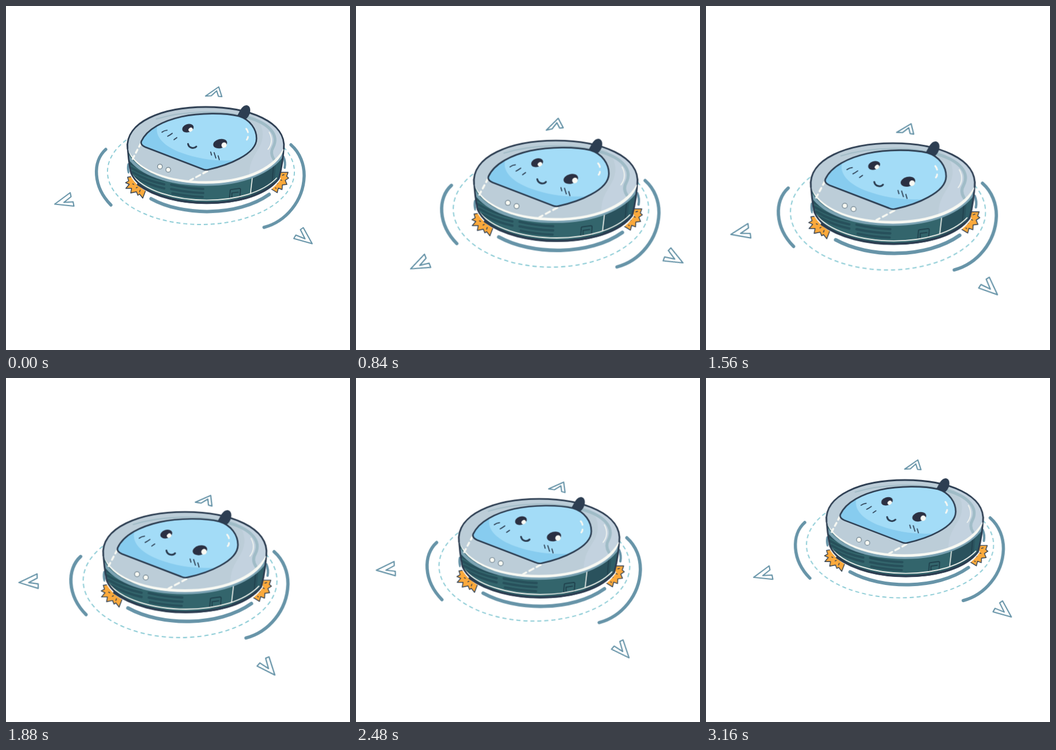
Recreate the animation shown at these times as an HTML page without scripts. Size 600 by 600 pixels, loop 3200 ms.

```html
<!DOCTYPE html>
<html lang="en">
<head>
<meta charset="utf-8">
<title>Robot vacuum</title>
<style>
html, body { margin: 0; width: 100%; height: 100%; overflow: hidden; background: #fff; }
svg { display: block; width: 100vw; height: 100vh; }
.line { fill: none; stroke-linecap: round; stroke-linejoin: round; }
.navy { stroke: #2b3c50; }
.white { stroke: #f8f9f3; }

/* The robot drives a triangle, growing as it comes nearer */
.drive { transform-origin: 348.5px 345px; animation: drive 3.2s linear infinite; }
.floor { transform-origin: 339px 298.5px; animation: floor 3.2s linear infinite; }
.orbit { transform-origin: 340px 289px; animation: orbit 3.2s linear infinite; }
.turn { transform-origin: 345px 247.5px; animation: turn 3.2s cubic-bezier(.333, 0, .667, 1) infinite; }

@keyframes drive {
  0%, 100% { transform: translate(0, 0) scale(1); }
  32.5% { transform: translate(0, 82px) scale(1.056); }
  65% { transform: translate(-45px, 61px) scale(1.041); }
}
@keyframes floor {
  0%, 100% { transform: translate(0, 0) scale(1); }
  32.5% { transform: translate(0, 80.5px) scale(1.057); }
  65% { transform: translate(-45px, 59.5px) scale(1.042); }
}
@keyframes orbit {
  0%, 100% { transform: translate(0, 0) scale(1, 1); }
  32.5% { transform: translate(0, 80.5px) scale(1.056, 1.125); }
  65% { transform: translate(-45px, 60.5px) scale(1.032, 1.07); }
}
@keyframes turn {
  0%, 86.25%, 100% { transform: rotate(0deg); }
  12.5%, 27% { transform: rotate(-10deg); }
  36.25%, 51% { transform: rotate(4deg); }
  62%, 74% { transform: rotate(13deg); }
}
</style>
</head>
<body>
<svg viewBox="0 0 600 600">
  <defs>
    <clipPath id="wallClip">
      <path id="wall" d="M212 241 Q213 268 218 291 C232 324 290 343.500 350 343.500 C408 343.500 456 328 476 301 Q484 270 484.500 241Z"/>
    </clipPath>
    <clipPath id="lidClip"><ellipse cx="348.500" cy="242.500" rx="136.300" ry="67.500"/></clipPath>
    <path id="panel" d="M236 236 C246 214 275 200 306 193 C338 186 382 186 406 192 C426 198 437 215 437 231 C437 246 424 257 407 266 C389 276 368 282 352 285.500 Q347 286.500 342 284 L243 246 Q234 242 236 236Z"/>
    <clipPath id="panelClip"><use href="#panel"/></clipPath>
  </defs>

  <ellipse class="orbit" cx="340" cy="289" rx="163" ry="92" fill="none" stroke="#8bcbd5" stroke-width="1.900" stroke-dasharray="7 5"/>

  <g class="floor line" stroke="#6794a8" stroke-width="5.500">
    <path d="M174 250 C150.500 271 151.500 315 183 347"/>
    <path d="M497 242 C513 256 520.500 277 520 297 C518.500 340 488 376 450 386"/>
    <path d="M253 336 C308 366.500 404 367.500 459 328.500" stroke-width="6"/>
    <path d="M213.500 276 Q212 283 214 290 M484 263 Q488 272 486 282" stroke-width="4"/>
  </g>

  <g class="floor">
    <g class="turn" fill="#fff" stroke="#6794a8" stroke-width="2.100" stroke-linejoin="round">
      <path d="M348 157 L371 141 L376.500 158 L370.500 157.500 L367.500 148 L358 156.500Z"/>
      <path d="M85 345.500 L112 325.500 L113.500 332.500 L101 342.500 L117 341.500 L118.500 349Z"/>
      <path d="M534 414.500 L502 405.500 L505.500 399.500 L521.500 406 L513.500 390 L518.500 386.500Z"/>
    </g>
  </g>

  <g class="drive">
    <g class="navy" fill="#fba93c" stroke-width="1.400" stroke-linejoin="round">
      <path d="M222 297 L212 298.500 L214 305 L208.500 308 L215 311 L209 318 L219 318 L217.500 326 L227.500 324 L230 330 L233 328 L238.500 335 L245 318Z"/>
      <path d="M473 290 L492 290 L489.500 297 L493 300 L487 304 L490 311 L482 312 L481.500 320 L475 317.500 L473 325.500 L460 317.500Z"/>
      <path class="line" d="M221 310 l2 1 M227 317 l2 -1 M234 321 l-1 3 M482 295 l3 -1 M479 303 l2 1 M472 310 l2 -1 M470 317 l1 1"/>
    </g>
    <path class="line" stroke="#fff" stroke-width="6" d="M218 291 C232 324 290 346 350 346 C408 346 456 331 476 301"/>

    <!-- side wall -->
    <use href="#wall" fill="#33656c"/>
    <g clip-path="url(#wallClip)">
      <path d="M430 285 L426 345 L490 330 V240Z" fill="#2a525d"/>
      <path d="M472 260 L468 310 L490 300 V240Z" fill="#2f5e68"/>
      <g class="line" stroke="#27505b" stroke-width="4">
        <path d="M217 274 Q243 290 276 297 M218 282 Q245 298 276 304 M221 290 Q246 305 276 311 M226 299 Q249 312 276 318"/>
        <path d="M288 304 Q316 310 344 311 M288 311.500 Q316 318 344 319 M288 319 Q316 325 344 326 M290 326.500 Q316 332 343 333"/>
      </g>
      <path class="line white" stroke-width="1.600" d="M430 296 L426.500 326"/>
      <path class="line" stroke="#203f4c" stroke-width="1.500" d="M467 272 L464 308"/>
      <g class="line" stroke="#1f3f4b" stroke-width="1.700">
        <path d="M393 320 L407 318 Q409 318 409 320 L408 332 Q408 334 406 334 L392 335.500 Q390 335.500 390 333 L391 322 Q391 320 393 320Z"/>
        <path d="M394 326 L405 324.500 M394 326 V334"/>
      </g>
      <path class="line white" stroke-width="1.700" d="M219 293 C240 322 295 338.500 350 338.500 C402 338.500 448 325 472 300"/>
      <path class="line" stroke="#7ba3b3" stroke-width="5" d="M212 260 C232 294 285 311 348 311 C411 311 463 291 485 256"/>
    </g>
    <use href="#wall" class="line navy" stroke-width="2.800"/>
    <path class="line navy" stroke-width="3.500" d="M230 311 C260 333 305 343.500 350 343.500 C400 343.500 443 332 467 310"/>

    <!-- lid -->
    <ellipse cx="348.500" cy="242.500" rx="136.300" ry="67.500" fill="#bccdd8"/>
    <g clip-path="url(#lidClip)">
      <path d="M408 180 C446 190 457 222 440 249 C430 266 424 274 424 300 L490 280 V190Z" fill="#c3d2df"/>
      <path class="line" stroke="#a2bdc8" stroke-width="2" d="M262 197 C310 182 376 181 418 193"/>
      <path class="line" stroke="#a0bcc7" stroke-width="5" d="M421 194 C458 204 477 224 466 246 Q460 256 467 267"/>
      <path class="line white" stroke-width="1.500" d="M459 220 C465 231 464 241 457 250"/>
      <path class="line white" stroke-width="4.500" d="M212 254 C232 290 285 307.500 348 307.500 C411 307.500 463 288 485 251"/>
    </g>
    <path class="line navy" stroke-width="2.800" d="M212 249 C207 202 273 176 348.500 176 C424 176 490 202 484.500 249"/>

    <g class="line white" stroke-width="3.300">
      <path stroke-dasharray="6 6" d="M235 240 L219 270"/>
      <path stroke-dasharray="8 6" d="M351 288 L321 304"/>
    </g>
    <g fill="#f8f9f3" stroke="#70838f" stroke-width="1.200">
      <circle cx="268.500" cy="280" r="4.200"/>
      <circle cx="283" cy="285.500" r="4.200"/>
    </g>

    <path d="M399 197 C407 189 409 173 420 173 C428 174.500 427 186 423 192 Q419 198 412 201Z" fill="#2d3e52"/>

    <!-- face -->
    <use href="#panel" fill="#a3dcf7"/>
    <g clip-path="url(#panelClip)">
      <path d="M268 200 C254 222 271 243 306 256 C336 267 368 271 400 269 L350 295 L225 250 V215Z" fill="#87ccef"/>
    </g>
    <use href="#panel" class="line navy" stroke-width="2.600"/>
    <path class="line white" stroke-width="3" d="M419 214 Q421.500 217 422 220 M422 228 Q422 231 420 233"/>
    <g fill="#2b3042">
      <ellipse cx="317.300" cy="213" rx="10.300" ry="7" transform="rotate(-18 317.300 213)"/>
      <ellipse cx="373.500" cy="240" rx="12.300" ry="8" transform="rotate(-14 373.500 240)"/>
    </g>
    <g fill="#f8f9f3">
      <ellipse cx="322" cy="215.500" rx="4" ry="3.300" transform="rotate(-40 322 215.500)"/>
      <ellipse cx="380.300" cy="242.500" rx="4.500" ry="4.800" transform="rotate(30 380.300 242.500)"/>
    </g>
    <path class="line navy" stroke-width="3" d="M317.500 240.500 C319 248 328 249.500 332 245"/>
    <path class="line navy" stroke-width="1.700" d="M272 220 Q276 217 281 216.500 M282 227 Q286 225 290 222 M293 233 L298 229.500 M357 254.500 L358.500 260 M363 255.500 L366 265 M370 261 L372 268"/>
  </g>
</svg>
</body>
</html>
```
